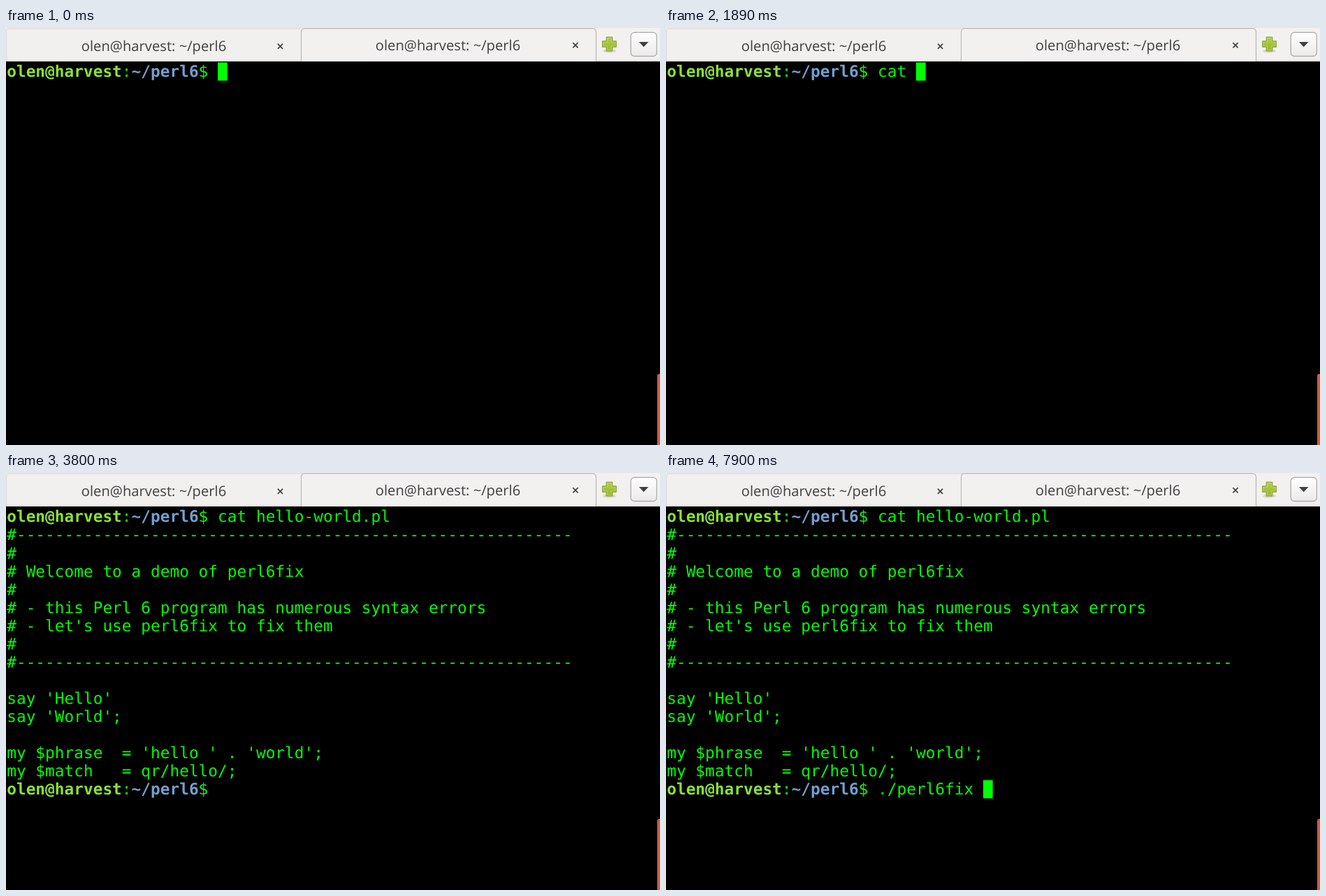
Recreate the animation shown at these times as an HTML page with a canvas. Size 936 px wide and 598 px high, loop 8 s.

```html
<!DOCTYPE html>
<html lang="en">
<head>
<meta charset="utf-8">
<title>Terminal</title>
<style>
  html, body { margin: 0; width: 100%; height: 100%; overflow: hidden; background: #000; }
  canvas { display: block; }
</style>
</head>
<body>
<canvas id="stage" width="936" height="598"></canvas>
<script>
const ctx = document.getElementById('stage').getContext('2d');
const LOOP = 8000;
const CELL = 13.72, ROW = 26.07, LEFT = 1.2, TOP = 49.4, ASCENT = 21;
const GREEN = '#00ff00', PANEL = '#f2f1f0', INK = '#404040';
const USER = 'olen@harvest', DIR = '~/perl6';
const PROMPT_LEN = (USER + ':' + DIR + '$ ').length;
const RULE = '#' + '-'.repeat(58);

const LISTING = [
  RULE,
  '#',
  '# Welcome to a demo of perl6fix',
  '#',
  '# - this Perl 6 program has numerous syntax errors',
  "# - let's use perl6fix to fix them",
  '#',
  RULE,
  '',
  "say 'Hello'",
  "say 'World';",
  '',
  "my $phrase  = 'hello ' . 'world';",
  'my $match   = qr/hello/;'
];
const CAT = 'cat hello-world.pl';
const RUN = './perl6fix ';
const LISTED = 3800;

// [start ms, characters typed, cursor visible]
const CAT_STEPS = [
  [0, 0, true], [910, 1, true], [1210, 2, true], [1260, 3, true], [1890, 4, true],
  [2710, 5, true], [2830, 6, true], [3030, CAT.length, false]
];
const RUN_STEPS = [
  [LISTED, 0, false], [6900, 1, false], [6960, 2, false],
  [7500, 3, true], [7570, 4, true], [7640, 5, true], [7900, RUN.length, true]
];

const stepAt = (steps, t) => steps.filter(s => s[0] <= t).pop();

function print(text, col, row, color = GREEN, weight = 'normal') {
  ctx.font = weight + ' 22.79px "DejaVu Sans Mono", monospace';
  ctx.fillStyle = color;
  [...text].forEach((ch, i) =>
    ctx.fillText(ch, LEFT + (col + i) * CELL, TOP + row * ROW + ASCENT));
}

function commandLine(row, command, steps, t) {
  const [, count, cursor] = stepAt(steps, t);
  print(USER, 0, row, '#8ae234', 'bold');
  print(':', USER.length, row);
  print(DIR, USER.length + 1, row, '#729fcf', 'bold');
  print('$', PROMPT_LEN - 2, row);
  print(command.slice(0, count), PROMPT_LEN, row);
  if (cursor) {
    ctx.fillStyle = GREEN;
    ctx.fillRect(LEFT + (PROMPT_LEN + count) * CELL, TOP + row * ROW, CELL, ROW);
  }
}

function gradient(y0, y1, from, to) {
  const g = ctx.createLinearGradient(0, y0, 0, y1);
  g.addColorStop(0, from);
  g.addColorStop(1, to);
  return g;
}

function roundBox(x, y, w, h, r, fill, stroke) {
  ctx.beginPath();
  ctx.roundRect(x, y, w, h, r);
  ctx.fillStyle = fill;
  ctx.fill();
  if (!stroke) return;
  ctx.strokeStyle = stroke;
  ctx.lineWidth = 1.2;
  ctx.stroke();
}

function tabLabel(center, baseline, closeX, closeY) {
  ctx.font = '20.2px "Open Sans", sans-serif';
  ctx.fillStyle = INK;
  ctx.textAlign = 'center';
  ctx.fillText(USER + ': ' + DIR, center, baseline);
  ctx.textAlign = 'left';
  ctx.beginPath();
  for (const d of [-3.6, 3.6]) {
    ctx.moveTo(closeX - 3.6, closeY - d);
    ctx.lineTo(closeX + 3.6, closeY + d);
  }
  ctx.strokeStyle = INK;
  ctx.lineWidth = 1.7;
  ctx.stroke();
}

function plusPath(x, y, a, b) {
  ctx.beginPath();
  [[-a, -b], [a, -b], [a, -a], [b, -a], [b, a], [a, a],
   [a, b], [-a, b], [-a, a], [-b, a], [-b, -a], [-a, -a]]
    .forEach(([dx, dy]) => ctx.lineTo(x + dx, y + dy));
  ctx.closePath();
}

function plusIcon(x, y) {
  ctx.fillStyle = 'rgba(0,0,0,0.12)';
  ctx.beginPath();
  ctx.ellipse(x, y + 10, 9.5, 2.5, 0, 0, Math.PI * 2);
  ctx.fill();
  ctx.lineJoin = 'round';
  ctx.lineWidth = 1.2;
  plusPath(x, y, 4.2, 9.8);
  ctx.fillStyle = gradient(y - 10, y + 10, '#b4cc48', '#9ab82e');
  ctx.fill();
  ctx.strokeStyle = '#85a028';
  ctx.stroke();
  plusPath(x, y, 3, 8.6);
  ctx.strokeStyle = 'rgba(255,255,255,0.25)';
  ctx.stroke();
}

function menuButton() {
  roundBox(893.7, 6.5, 38, 35, 6, '#dad8d6');
  roundBox(894.3, 6.4, 37, 34, 5, gradient(6, 41, '#ffffff', '#ebeae9'), '#acaaa8');
  ctx.beginPath();
  ctx.moveTo(906, 20);
  ctx.lineTo(919.5, 20);
  ctx.lineTo(912.7, 27.3);
  ctx.fillStyle = INK;
  ctx.fill();
}

function tabBar() {
  ctx.fillStyle = PANEL;
  ctx.fillRect(0, 0, 936, 48);
  roundBox(0.5, 0.9, 424, 52, [4, 0, 0, 0], '#f1f0ef', '#dedcda');
  ctx.fillStyle = '#d2d0ce';
  ctx.fillRect(0, 46.5, 936, 1);
  roundBox(422.5, 0.6, 422, 52, [5, 5, 0, 0], PANEL, '#bbb9b7');
  tabLabel(211.5, 33, 392.5, 26.2);
  tabLabel(632.5, 32, 815, 24.7);
  plusIcon(863.5, 23);
  menuButton();
}

function draw(t) {
  tabBar();
  ctx.fillStyle = '#000';
  ctx.fillRect(0, 48, 936, 550);
  commandLine(0, CAT, CAT_STEPS, t);
  if (t >= LISTED) {
    LISTING.forEach((line, i) => print(line, 0, i + 1));
    commandLine(LISTING.length + 1, RUN, RUN_STEPS, t);
  }
  roundBox(932, 496, 6, 104, [3, 0, 0, 0], '#cd5e3a');
}

ctx.textRendering = 'geometricPrecision';
const start = performance.now();
function tick() {
  draw((performance.now() - start) % LOOP);
  requestAnimationFrame(tick);
}
tick();
</script>
</body>
</html>
```
